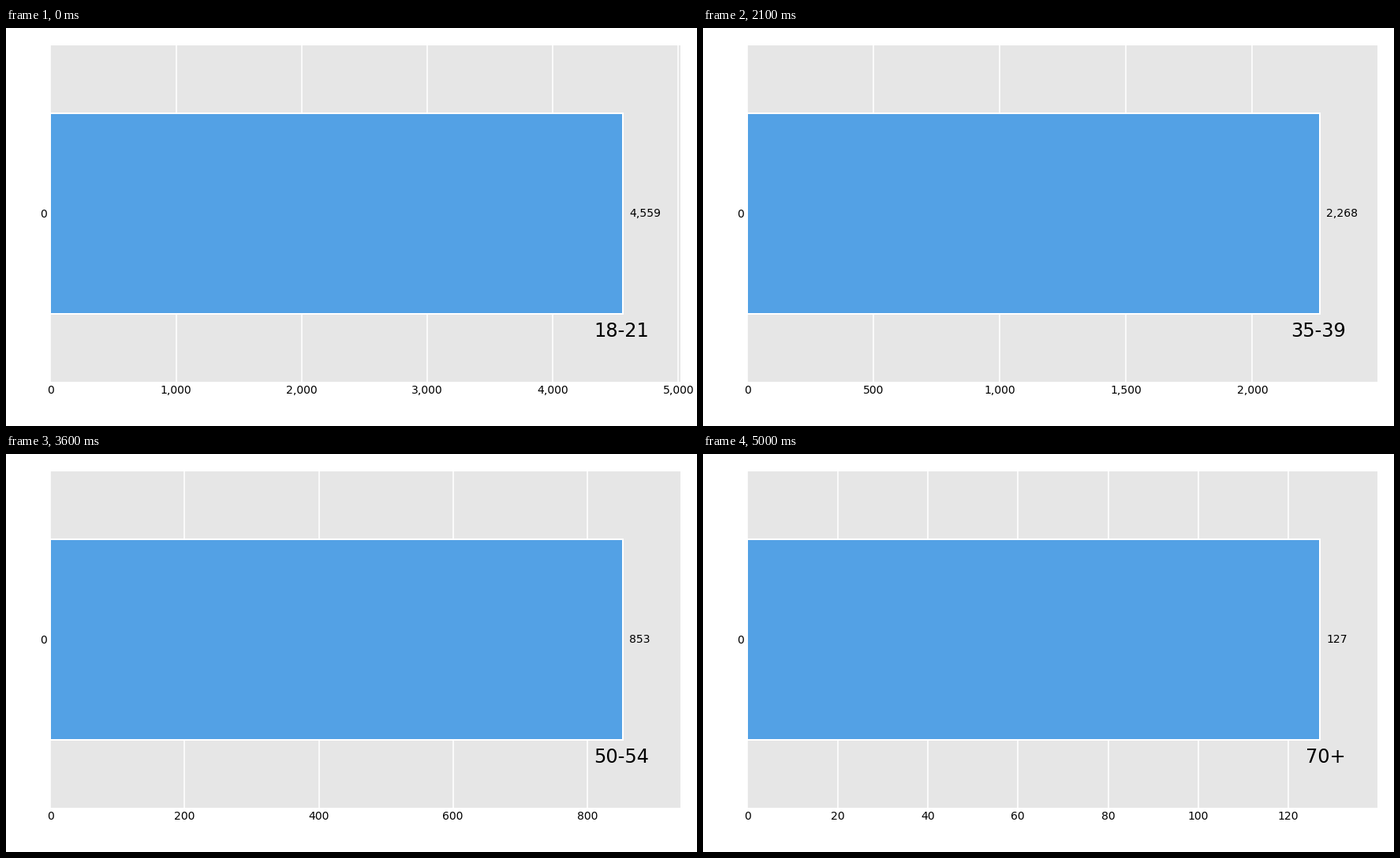
Write a matplotlib script that moves like this. It is 876 px wide and 504 px high and loops after 5050 ms.

```python
import matplotlib.pyplot as plt
from matplotlib.animation import FuncAnimation
from matplotlib.ticker import StrMethodFormatter

W, H, DPI = 876, 504, 144
LEFT, RIGHT, TOP, BOTTOM = 56.3, 854.7, 21.8, 448.2
STEPS = 10
INTERVAL = 50

GROUPS = [
    ("18-21", 4559), ("25-29", 4472), ("22-24", 4283), ("30-34", 2972),
    ("35-39", 2353), ("40-44", 1927), ("45-49", 1253), ("50-54", 914),
    ("55-59", 611), ("60-69", 526), ("70+", 127),
]
FRAMES = (len(GROUPS) - 1) * STEPS + 1

plt.rcParams["font.family"] = "DejaVu Sans"

fig = plt.figure(figsize=(W / DPI, H / DPI), dpi=DPI, facecolor="white")
ax = fig.add_axes([LEFT / W, 1 - BOTTOM / H,
                   (RIGHT - LEFT) / W, (BOTTOM - TOP) / H])
ax.set_facecolor("0.9")
ax.set_axisbelow(True)
ax.grid(True, axis="x", color="white", linewidth=0.8)
ax.tick_params(labelsize=7, length=0, pad=2)
ax.spines[:].set_visible(False)
ax.set_ylim(0.2, 1.8)
ax.set_yticks([1], ["0"])
ax.xaxis.set_major_formatter(StrMethodFormatter("{x:,.0f}"))

bar = ax.barh(1, 1, height=0.95, color="#53a1e5",
              edgecolor="white", linewidth=1)[0]
value_text = ax.text(0, 1, "", size=7, ha="left", va="center")
group_text = ax.text(0.95, 0.15, "", size=12, ha="right", va="center",
                     transform=ax.transAxes)


def value_at(frame):
    """Linear blend between neighbouring age groups."""
    i, step = divmod(frame, STEPS)
    start = GROUPS[i][1]
    end = GROUPS[min(i + 1, len(GROUPS) - 1)][1]
    return start + (end - start) * step / STEPS


def update(frame):
    value = value_at(frame)
    limit = value * 1.1
    ax.set_xlim(0, limit)
    bar.set_width(value)
    value_text.set_x(value + 0.01 * limit)
    value_text.set_text(f"{value:,.0f}")
    group_text.set_text(GROUPS[frame // STEPS][0])
    return bar, value_text, group_text


def init():
    return update(0)


anim = FuncAnimation(fig, update, frames=FRAMES, init_func=init,
                     interval=INTERVAL, repeat=True, repeat_delay=0,
                     blit=False)
plt.show()
```
